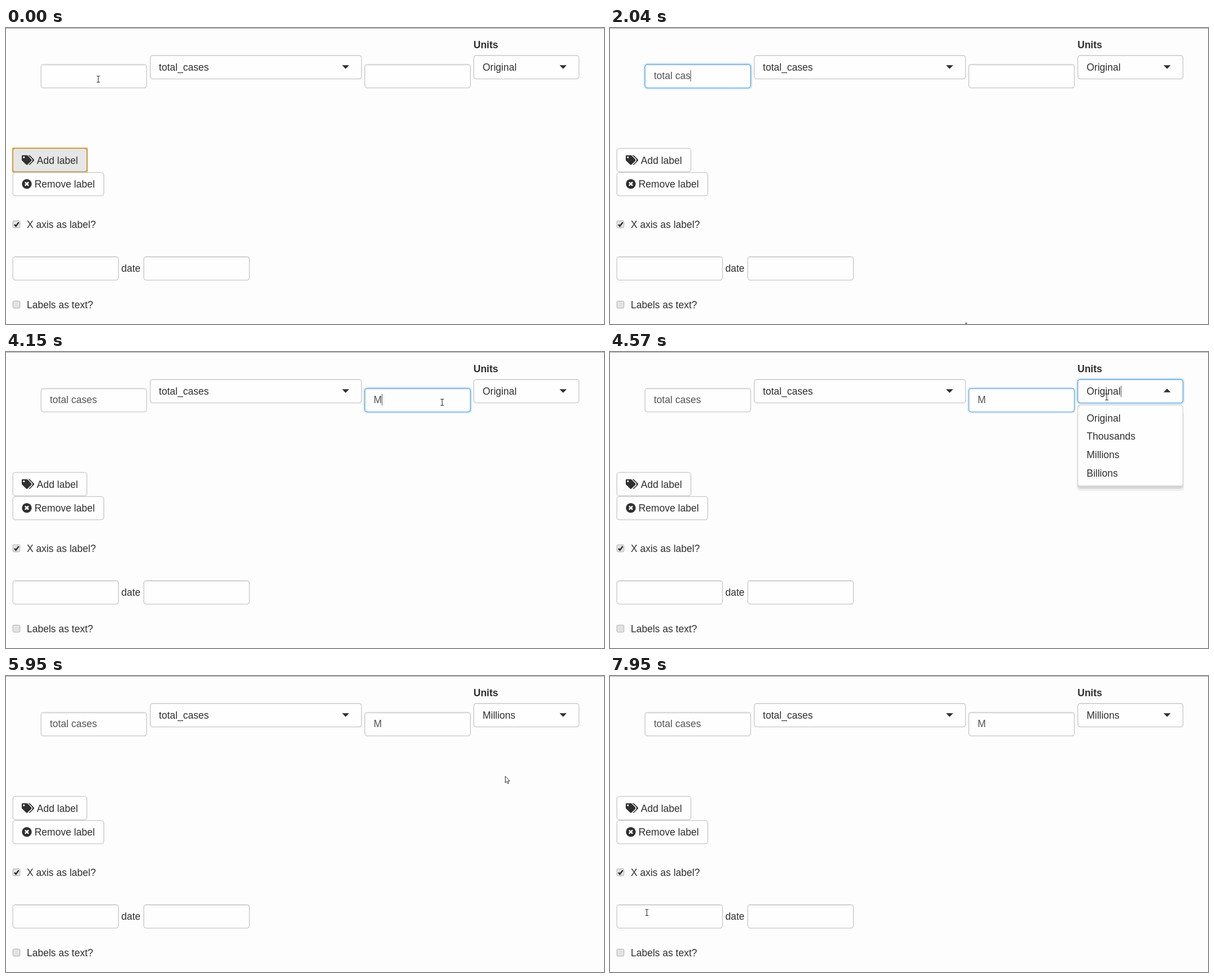
These frames come from a looping animation (1063 by 527 pixels, 8 s). An HTML page:

```html
<!DOCTYPE html>
<html lang="en">
<head>
<meta charset="utf-8">
<title>Label form</title>
<style>
html, body { margin: 0; width: 100%; height: 100%; overflow: hidden; background: #fdfdfd; }
svg { display: block; }
text { font: 17.55px "Liberation Sans", Arial, sans-serif; fill: #2f2f2f; white-space: pre; }
.typed { fill: #555; }
.bold { font-weight: bold; }
</style>
</head>
<body>
<svg id="stage" width="1063" height="527" viewBox="0 0 1063 527"></svg>
<script>
const LOOP = 8000;
const INK = '#2f2f2f';
const stage = document.getElementById('stage');

function add(tag, attrs, parent = stage) {
  const node = document.createElementNS('http://www.w3.org/2000/svg', tag);
  for (const name in attrs) node.setAttribute(name, attrs[name]);
  parent.appendChild(node);
  return node;
}

function label(x, y, string, cls = '', parent = stage) {
  const node = add('text', { x, y, class: cls }, parent);
  node.textContent = string;
  return node;
}

// Rounded control with an optional blue focus ring
function box(x, y, w, h = 41.6) {
  const shape = { x, y, width: w, height: h, rx: 4.5 };
  const glow = add('g', { fill: 'none', stroke: '#66afe9', opacity: 0 });
  for (const width of [3, 5, 7]) add('rect', { ...shape, 'stroke-width': width, 'stroke-opacity': .12 }, glow);
  const body = add('rect', { ...shape, fill: '#fefefe', stroke: '#c8c8c8', 'stroke-width': 1.35 });
  const ring = add('rect', { ...shape, fill: 'none', stroke: '#66afe9', 'stroke-width': 1.35, opacity: 0 });
  return {
    x, y, w, h, body,
    contains: (px, py) => px >= x && px <= x + w && py >= y && py <= y + h,
    focus(amount) {
      glow.setAttribute('opacity', amount * amount);
      ring.setAttribute('opacity', amount);
    }
  };
}

function input(x, y) {
  const field = box(x, y, 187.7);
  add('path', { d: `M${x + 4} ${y + 1.3}h${field.w - 8}`, stroke: '#eee', 'stroke-width': 1.2 });
  return field;
}

function arrow(x, y, height) {
  return add('path', { d: `M${x - 6.3} ${y}h12.6l-6.3 ${height}z`, fill: INK });
}

function checkbox(y, checked) {
  add('rect', { x: 12.2, y, width: 12.6, height: 12.6, rx: 2, fill: '#e3e3e3', stroke: '#adadad' });
  if (checked) add('path', { d: `M15 ${y + 6.6}l2.6 2.9 5-6.6`, fill: 'none', stroke: INK, 'stroke-width': 2.5 });
}

const caretAt = y => add('rect', { y, width: 1, height: 20, fill: '#555' });
const show = (node, visible) => node.setAttribute('visibility', visible ? 'visible' : 'hidden');

add('rect', { width: 1063, height: 1, fill: '#a3a3a3' });
label(831, 36, 'Units', 'bold');

const prefix = input(62.3, 65);
const prefixText = label(78, 91.3, '', 'typed');
const prefixCaret = caretAt(75);
box(256.4, 49, 375.6);
label(271.8, 76, 'total_cases');
arrow(603.7, 66.3, 6.5);
const suffix = input(637.8, 65);
const suffixText = label(653.4, 91.3, '', 'typed');
const suffixCaret = caretAt(75);
const units = box(831.5, 49, 187);
const unitsText = label(847.2, 76, '');
const unitsCaret = caretAt(60);
const arrowDown = arrow(990.3, 66.3, 6.5);
const arrowUp = arrow(990.3, 71.8, -6.5);

const addButton = box(12.2, 214.3, 131.6);
const outline = add('rect', { x: 11.8, y: 213.8, width: 132.6, height: 42.8, rx: 1, fill: 'none', stroke: '#dca032', 'stroke-width': 1.8 });
add('path', {
  d: 'M28 228q0-1.6 1.6-1.6h7q1 0 1.7.7l6.6 6.6q1.5 1.5 0 3l-6.4 6.4q-1.5 1.5-3 0l-7-7q-.5-.5-.5-1.3z' +
     'M39.4 226.4h1.6q1 0 1.7.7l6.7 6.6q1.4 1.5 0 3l-6.4 6.4q-1.3 1.3-2.6.3l6-6q1.8-2.2 0-4.4z',
  fill: INK
});
add('circle', { cx: 31.8, cy: 230.2, r: 1.6, fill: '#f4f4f4' });
label(54.7, 241.5, 'Add label');

box(12.2, 257.4, 161.6, 41.2);
add('circle', { cx: 37, cy: 277.6, r: 8.7, fill: INK });
add('path', { d: 'M33.9 274.5l6.2 6.2m0-6.2l-6.2 6.2', stroke: '#fff', 'stroke-width': 2.5 });
label(50.7, 284, 'Remove label');

checkbox(343.2, true);
label(36.9, 356, 'X axis as label?');
const before = input(12.2, 407.2);
label(205, 433.5, 'date');
const after = input(244.9, 407.2);
checkbox(486.2, false);
label(36.9, 499, 'Labels as text?');

const menu = add('g', {});
add('rect', { x: 829.5, y: 105, width: 191, height: 142.5, rx: 7, fill: '#000', opacity: .06 }, menu);
add('rect', { x: 831, y: 105, width: 188, height: 138.5, rx: 6, fill: '#000', opacity: .1 }, menu);
add('rect', { x: 831.5, y: 94.4, width: 187, height: 144, rx: 4, fill: '#fefefe', stroke: '#d0d0d0', 'stroke-width': 1.2 }, menu);
['Original', 'Thousands', 'Millions', 'Billions'].forEach((name, i) => label(847.2, 123.6 + i * 32.8, name, '', menu));

const beam = add('path', { d: 'M-2.8-5.5h2l.8.7.8-.7h2M0-5v10M-2.8 5.5h2l.8-.7.8.7h2', fill: 'none', stroke: INK, 'stroke-width': 1.1 });
const pointer = add('path', { d: 'M.5.5v11.6l2.7-2.5 1.9 4.2 1.8-.8-1.9-4.1h3.6z', fill: '#fff', stroke: INK });

const during = (t, from, to) => t >= from && t < to;
const clamp = v => Math.min(1, Math.max(0, v));
const ease = v => v * v * (3 - 2 * v);
const fade = (t, from) => clamp((t - from) / 190);

// Characters appear evenly, the first at `from` and the last at `to`
function typed(string, t, from, to) {
  if (t < from) return '';
  return string.slice(0, 1 + Math.round((string.length - 1) * clamp((t - from) / (to - from))));
}

// Places where the mouse rests or turns: arrival, departure, x, y
const stops = [
  [0, 0, 164, 91], [150, 1490, 163, 90], [2040, 2040, 632, 524], [2410, 2410, 826, 254],
  [2950, 4010, 737, 93], [4430, 4570, 883, 80], [5140, 5140, 922, 149], [5410, 5950, 887, 178],
  [6600, 6600, 124, 440], [7000, 7000, 900, 256], [7950, LOOP, 65.5, 421]
];

function mouseAt(t) {
  const i = stops.findLastIndex(stop => stop[0] <= t);
  const [, leave, x, y] = stops[i];
  if (t <= leave || i === stops.length - 1) return [x, y];
  const [arrive, , nextX, nextY] = stops[i + 1];
  const k = ease((t - leave) / (arrive - leave));
  return [x + (nextX - x) * k, y + (nextY - y) * k];
}

function placeCaret(caret, text, visible) {
  caret.setAttribute('x', Math.round(Number(text.getAttribute('x')) + text.getComputedTextLength()));
  show(caret, visible);
}

function render(t) {
  const pressed = t < 150;
  addButton.body.setAttribute('fill', pressed ? '#e6e6e6' : '#fefefe');
  addButton.body.setAttribute('stroke', pressed ? '#8c8c8c' : '#c8c8c8');
  show(outline, pressed);

  prefix.focus(fade(t, 60) - fade(t, 3150));
  suffix.focus(fade(t, 3080) - fade(t, 4540));
  units.focus(fade(t, 4380) - fade(t, 5580));

  prefixText.textContent = typed('total', t, 820, 1220) + typed(' cases', t, 1490, 2410);
  suffixText.textContent = typed('M', t, 3770, 3770);
  unitsText.textContent = t < 5690 ? 'Original' : 'Millions';
  placeCaret(prefixCaret, prefixText, during(t, 150, 680) || during(t, 820, 2950));
  placeCaret(suffixCaret, suffixText, during(t, 3220, 4290));
  placeCaret(unitsCaret, unitsText, during(t, 4570, 5010));

  const open = during(t, 4570, 5690);
  show(menu, open);
  show(arrowUp, open);
  show(arrowDown, !open);

  const [x, y] = mouseAt(t);
  const hidden = during(t, 1490, 2040);
  const overField = [prefix, suffix, units, before, after].some(field => field.contains(x, y));
  show(beam, overField && !hidden);
  show(pointer, !overField && !hidden);
  (overField ? beam : pointer).setAttribute('transform', `translate(${x} ${y})`);
}

const start = performance.now();
function frame() {
  render((performance.now() - start) % LOOP);
  requestAnimationFrame(frame);
}
frame();
</script>
</body>
</html>
```
